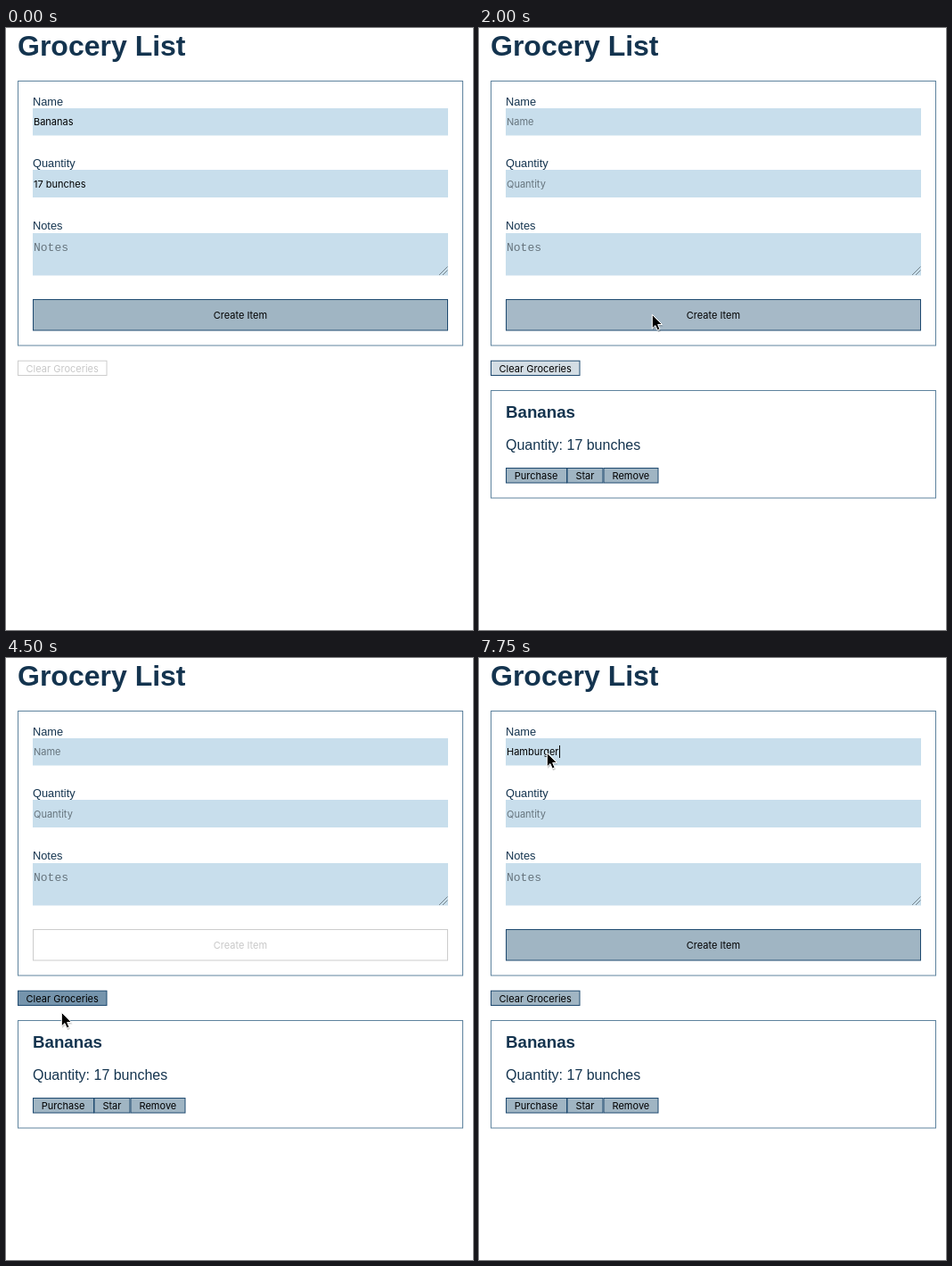
These frames come from a looping animation (524x675 px, 8000 ms). An HTML page:

```html
<!DOCTYPE html>
<html lang="en">
<head>
<meta charset="utf-8">
<title>Grocery List</title>
<style>
  html, body { margin: 0; width: 100%; height: 100%; overflow: hidden; background: #fff; }
  svg { display: block; width: 100vw; height: 100vh; }
  text { font-family: "Liberation Sans", Arial, sans-serif; fill: #14344f; white-space: pre; }
  .title { font-size: 32px; font-weight: bold; }
  .label { font-size: 12.8px; }
  .head { font-size: 18.72px; font-weight: bold; }
  .body { font-size: 16px; }
  .ui, .btn text { font-family: Inter, "Open Sans", sans-serif; font-size: 11px; fill: #000; }
  .btn text { text-anchor: middle; }
  .hint { fill: #66747d; }
  .mono { font-family: "Liberation Mono", monospace; font-size: 13px; fill: #66747d; }
  .panel { fill: none; stroke: #5e839e; }
  .field { fill: #c8deec; }
  .btn rect { fill: #a0b5c3; stroke: #1f4a70; }
  .btn.off rect { fill: #fff; stroke: #ccc; }
  .btn.off text { fill: #c8c8c8; }
  .grip { stroke: #74838c; fill: none; }
</style>
</head>
<body>
<svg viewBox="0 0 524 675">
  <text class="title" x="13" y="31">Grocery List</text>

  <rect class="panel" x="13.5" y="59.5" width="499" height="296.5"/>
  <text class="label" x="30" y="87">Name</text>
  <rect class="field" x="30" y="90" width="466" height="30.5"/>
  <text class="ui" id="name" x="31" y="109"></text>
  <text class="label" x="30" y="156">Quantity</text>
  <rect class="field" x="30" y="159" width="466" height="31"/>
  <text class="ui" id="qty" x="31" y="179"></text>
  <text class="label" x="30" y="226">Notes</text>
  <rect class="field" x="30" y="230" width="466" height="47.5"/>
  <text class="mono" x="31" y="250">Notes</text>
  <path class="grip" d="M486 277l9.500-9.500M490 277l5.500-5.500"/>

  <g class="btn" id="create">
    <rect x="30.500" y="304.500" width="465" height="34.500"/>
    <text x="263" y="326">Create Item</text>
  </g>
  <g class="btn" id="clear">
    <rect x="13.500" y="373.200" width="99.500" height="16.300"/>
    <text x="63.200" y="385.500">Clear Groceries</text>
  </g>

  <g id="item">
    <rect class="panel" x="13.500" y="406.500" width="499" height="120.500"/>
    <text class="head" x="30" y="437">Bananas</text>
    <text class="body" x="30" y="473">Quantity: 17 bunches</text>
    <g class="btn">
      <rect x="30.500" y="493.500" width="68" height="16.500"/>
      <text x="64.200" y="506">Purchase</text>
      <rect x="99" y="493.500" width="40" height="16.500"/>
      <text x="118.900" y="506">Star</text>
      <rect x="140" y="493.500" width="61" height="16.500"/>
      <text x="170.400" y="506">Remove</text>
    </g>
  </g>

  <rect id="caret" y="98" width="1" height="14"/>
  <g id="cursor">
    <path d="M.5 1.500V17L4 13.800 6.500 19.300 9.400 18 7 12.600H12Z" fill="#000" opacity=".18" transform="translate(.6 1)"/>
    <path d="M.3.300V16L3.900 12.600 6.300 18 9 16.800 6.700 11.500H11.500Z" fill="#000" stroke="#fff"/>
  </g>
</svg>
<script>
const LOOP = 8000, STEP = 250;
const $ = id => document.getElementById(id);

// Each track is a list of [start time, value]; a value holds until the next.
const cursorTrack = [
  [0, null], [250, [509, 0]], [500, [428, 92]], [750, [306, 228]], [1000, [216, 310]], [1250, [194, 321]],
  [2750, [168, 326]], [3000, [92, 345]], [3250, [24, 364]], [3500, [2, 376]], [3750, [36, 384]],
  [4000, [54, 382]], [4250, [60, 386]], [4500, [62, 397]], [4750, [118, 372]], [5000, [110, 312]],
  [5250, [98, 226]], [5500, [84, 148]], [5750, [77, 110]], [6000, [76, 106]]
];
const createTrack = [
  [0, ""], [1000, "#98aebf"], [1250, "#7895ab"], [1500, "#5f809b"], [1750, "#5b7d99"],
  [2000, "#a6b9c7"], [2250, "#eaeff2"], [2500, "off"], [6500, "#d0dae1"], [6750, "#a7b9c7"], [7000, ""]
];
const clearTrack = [
  [0, "off"], [2000, "#d3dde4"], [2250, "#a7b9c7"], [2500, ""],
  [4000, "#7f9bb0"], [4250, "#6284a0"], [4500, "#7594ac"], [4750, "#96adbe"], [5000, ""]
];
const nameTrack = [
  [0, "Bananas"], [2000, ""], [6500, "Ha"], [6750, "Ham"], [7000, "Hamb"],
  [7250, "Hambur"], [7500, "Hamburge"], [7750, "Hamburger"]
];

const at = (track, t) => track.findLast(([start]) => start <= t)[1];
const show = (el, on) => el.setAttribute("visibility", on ? "visible" : "hidden");

function setField(id, value, hint) {
  const el = $(id);
  el.textContent = value || hint;
  el.classList.toggle("hint", !value);
}

function setButton(id, state) {
  const off = state === "off";
  $(id).classList.toggle("off", off);
  $(id).querySelector("rect").style.fill = off ? "" : state;
}

function render(t) {
  const name = at(nameTrack, t), pos = at(cursorTrack, t);
  setField("name", name, "Name");
  setField("qty", t < 2000 ? "17 bunches" : "", "Quantity");
  setButton("create", at(createTrack, t));
  setButton("clear", at(clearTrack, t));
  show($("item"), t >= 2000);
  show($("caret"), t >= 6000);
  $("caret").setAttribute("x", Math.round(31 + (name ? $("name").getComputedTextLength() : 0)));
  show($("cursor"), pos);
  if (pos) $("cursor").setAttribute("transform", `translate(${pos})`);
}

const begin = performance.now();
let last = -1;
function tick() {
  const t = Math.floor((performance.now() - begin) % LOOP / STEP) * STEP;
  if (t !== last) render(last = t);
  requestAnimationFrame(tick);
}
tick();
</script>
</body>
</html>
```
